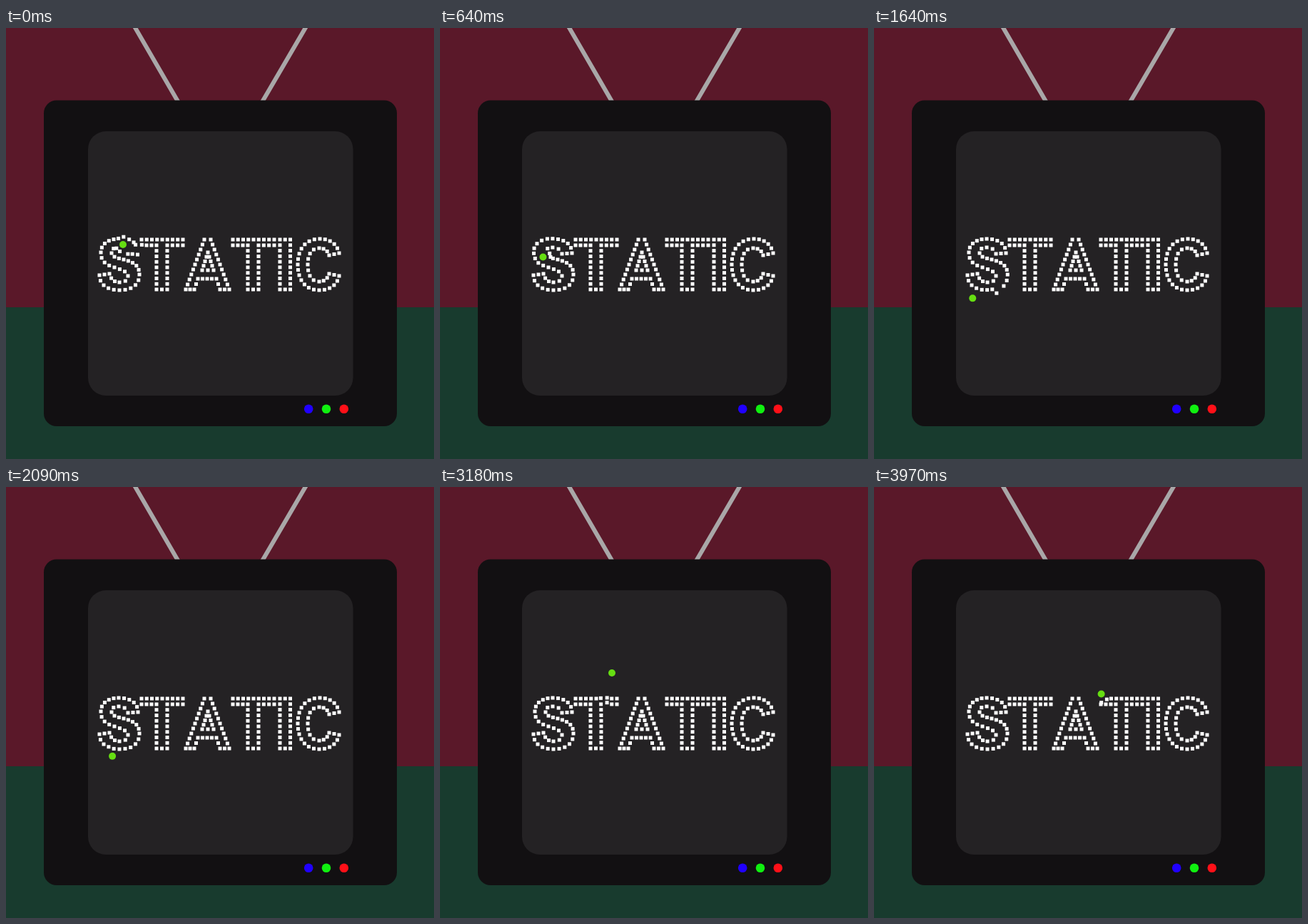
An HTML page for the animation above (4000 ms loop, 600 by 605 pixels).

```html
<!DOCTYPE html>
<html lang="en">
<head>
<meta charset="utf-8">
<title>Static</title>
<style>
  html, body { margin: 0; width: 100%; height: 100%; overflow: hidden; background: #5a1829; }
  svg { display: block; width: 100%; height: 100%; }
</style>
</head>
<body>
<svg viewBox="0 0 600 605">
  <rect width="600" height="605" fill="#5a1829"/>
  <rect y="392" width="600" height="213" fill="#183b2e"/>
  <path d="M179 -4L300 205L422 -4" fill="none" stroke="#a9a7a8" stroke-width="6"/>
  <rect x="53" y="101.5" width="495" height="457.5" rx="18" fill="#121012"/>
  <rect x="115" y="145" width="371.5" height="371" rx="25" fill="#242224"/>
  <circle cx="424.2" cy="534.7" r="6.3" fill="#2000ff"/>
  <circle cx="449" cy="534.7" r="6.3" fill="#10f010"/>
  <circle cx="473.8" cy="534.7" r="6.3" fill="#ff1018"/>
  <g id="squares" fill="#fff"></g>
  <circle id="pointer" r="5" fill="#66de12"/>
</svg>
<script>
const NS = 'http://www.w3.org/2000/svg';
const LOOP = 4000, FRAME = 30, STEP = 15, WARM_UP = -300;
const SPACING = 7.4, SIZE = 5, RADIUS = 10.5;

const letterT = 'M190 297L248 297L248 305L226 305L226 367L211 367L211 305L190 305L190 297';
const letters = [
  ['M131 347L145 345C147 353 152 357 159 357C167 357 172 353 171 348C170 341 160 339 152 336' +
   'C138 332 133 326 133 315C133 303 144 296 158 296C174 296 185 303 185 316L171 317' +
   'C169 311 165 308 158 308C151 308 147 311 148 316C149 322 157 323 165 325' +
   'C180 329 187 334 187 346C187 361 176 368 159 368C142 368 131 360 131 347', 0],
  [letterT, 0],
  ['M252 367L278 297L287 297L313 367L300 367L295 352L269 352L264 367L252 367', 0],
  ['M283 315L275 340L291 340L283 315', 0],
  [letterT, 128],
  ['M384 297L398.5 297L398.5 367L384 367L384 297', 0],
  ['M467 316L453 319C451 312 446 309 439 309C429 309 423 317 423 332C423 348 429 356 439 356' +
   'C446 356 451 352 453 345L467 348C464 361 454 368 439 368C420 368 409 354 409 332' +
   'C409 310 420 296 440 296C454 296 464 303 467 316', 0]
];

// Pointer route: time, x, y
const route = [
  [-300, 186, 312], [0, 164, 304], [250, 148, 299], [450, 139, 309], [640, 145, 322],
  [850, 162, 331], [1060, 179, 341], [1270, 180, 357], [1450, 163, 376], [1640, 136, 379],
  [1850, 122, 368], [2090, 152, 379], [2250, 178, 390], [2430, 212, 380], [2610, 234, 345],
  [2720, 236, 322], [2820, 230, 297], [2960, 230, 275], [3180, 241, 261], [3300, 262, 235],
  [3450, 282, 226], [3650, 302, 248], [3820, 313, 283], [3970, 319, 291]
];

function pointerAt(t) {
  const last = route.length - 1;
  let i = 0;
  while (i < last - 1 && route[i + 1][0] < t) i++;
  const a = route[i], b = route[i + 1];
  const before = route[Math.max(0, i - 1)], after = route[Math.min(last, i + 2)];
  const span = b[0] - a[0], u = Math.min(1, (t - a[0]) / span);
  return [1, 2].map(k => {
    const slopeA = (b[k] - before[k]) / (b[0] - before[0]) * span;
    const slopeB = (after[k] - a[k]) / (after[0] - a[0]) * span;
    const d = b[k] - a[k];
    return a[k] + u * (slopeA + u * (3 * d - 2 * slopeA - slopeB + u * (slopeA + slopeB - 2 * d)));
  });
}

// Spaces squares evenly along each segment, so that corners are always marked.
function outline([path, shift]) {
  const points = [];
  let from = '';
  for (const [, command, args] of path.matchAll(/([MLC])([^MLC]+)/g)) {
    if (command !== 'M') {
      const segment = document.createElementNS(NS, 'path');
      segment.setAttribute('d', `M${from}${command}${args}`);
      const length = segment.getTotalLength();
      const count = Math.max(1, Math.round(length / SPACING));
      for (let i = 0; i < count; i++) {
        const p = segment.getPointAtLength(length * i / count);
        points.push([p.x + shift, p.y]);
      }
    }
    from = args.split(' ').slice(-2).join(' ');
  }
  return points;
}

let seed = 7;
function random() {
  seed = (seed * 16807) % 2147483647;
  return seed / 2147483647;
}

const particles = letters.flatMap(outline).map(([x, y]) =>
  ({ x, y, homeX: x, homeY: y, push: 1 + random() * 30 }));

function moveParticle(p, [px, py]) {
  const dx = p.x - px, dy = p.y - py, distance = Math.hypot(dx, dy) || 0.01;
  if (distance < RADIUS) {
    const force = (1 - distance / RADIUS) * p.push / distance;
    p.x += dx * force;
    p.y += dy * force;
  } else {
    p.x += (p.homeX - p.x) / 10;
    p.y += (p.homeY - p.y) / 10;
  }
}

// The whole loop is simulated once; drawing only looks up a moment in it.
const moments = [];
for (let t = WARM_UP; t < LOOP; t += STEP) {
  const pointer = pointerAt(t);
  particles.forEach(p => moveParticle(p, pointer));
  if (t >= 0 && t % FRAME === 0) {
    moments.push({ pointer, squares: particles.map(p => [p.x, p.y]) });
  }
}

const group = document.getElementById('squares');
const dot = document.getElementById('pointer');
const rects = particles.map(() => {
  const rect = document.createElementNS(NS, 'rect');
  rect.setAttribute('width', SIZE);
  rect.setAttribute('height', SIZE);
  return group.appendChild(rect);
});

function draw(t) {
  const { pointer, squares } = moments[Math.min(moments.length - 1, Math.floor(t / FRAME))];
  squares.forEach(([x, y], i) => {
    rects[i].setAttribute('x', (x - SIZE / 2).toFixed(2));
    rects[i].setAttribute('y', (y - SIZE / 2).toFixed(2));
  });
  dot.setAttribute('cx', pointer[0].toFixed(2));
  dot.setAttribute('cy', pointer[1].toFixed(2));
}

const start = performance.now();
function tick(now) {
  draw(Math.max(0, now - start) % LOOP);
  requestAnimationFrame(tick);
}
draw(0);
requestAnimationFrame(tick);
</script>
</body>
</html>
```
